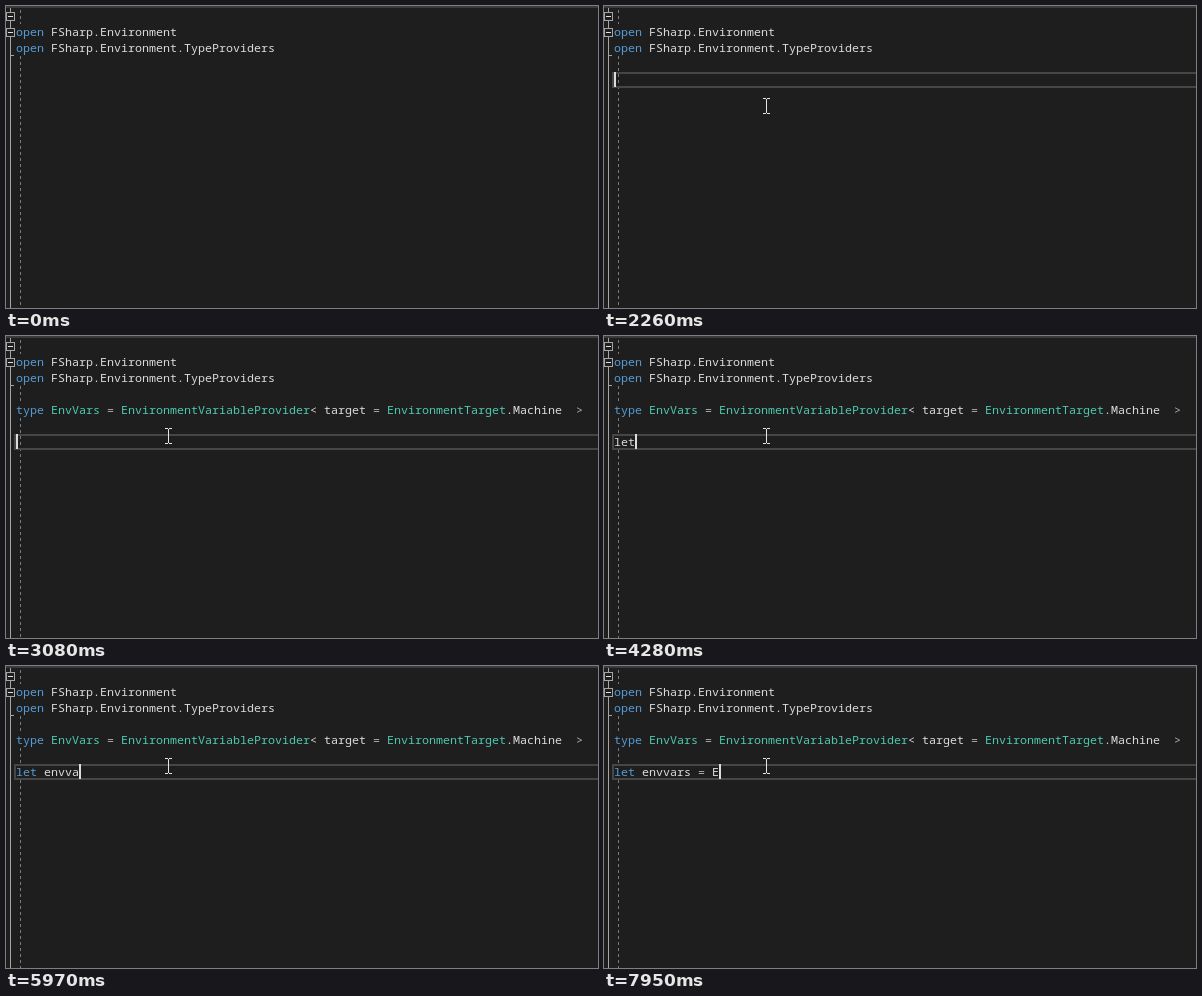
Write an HTML page with a canvas that moves like this. It is 592 px wide and 302 px high and loops after 8 s.

```html
<!DOCTYPE html>
<html lang="en">
<head>
<meta charset="utf-8">
<title>Code editor</title>
<style>
html, body { margin: 0; width: 100%; height: 100%; overflow: hidden; background: #1e1e1e; }
canvas { display: block; }
</style>
</head>
<body>
<canvas id="stage" width="592" height="302"></canvas>
<script>
const ctx = document.getElementById('stage').getContext('2d');
const LOOP = 8000, LEFT = 10, CELL = 7, LINE = 16;
const BLUE = '#569cd6', TEXT = '#dcdcdc', TEAL = '#4ec9b0', OPERATOR = '#b4b4b4';

const CLICK = 2010, PASTE = 2410, DIM = 2670, TYPES = 2720, UNDIM = 2900, ENTER = 3080;
const LET_BLUE = 4990, EQUALS_TINT = 7100;
const typed = 'let envvars = E';
const keyTimes = [4020, 4150, 4280, 4510, 4660, 4890, 5400, 5710, 5970, 6100, 6330, 6700, 6840, 7070, 7950];
const caretOff = [[3310, 3840], [5170, 5400], [6560, 6840], [7380, 7580]];

// time, x, y of the mouse pointer's centre
const path = [
  [1290, 317, 298], [1470, 173, 110], [1650, 173, 110], [1850, 113, 82],
  [1930, 113, 82], [2010, 113, 79], [2090, 116, 80], [2260, 162, 100], [LOOP, 162, 100]
];

function rect(x, y, w, h, color) {
  ctx.fillStyle = color;
  ctx.fillRect(x, y, w, h);
}

// runs: [text, colour] pairs, set on a fixed character grid
function write(top, runs) {
  let x = LEFT;
  for (const [text, color] of runs) {
    ctx.fillStyle = color;
    for (const ch of text) {
      ctx.fillText(ch, x, top + 12);
      x += CELL;
    }
  }
}

function guide(from, to) {
  for (let y = from; y < to; y += 6) rect(14, y, 1, Math.min(3, to - y), '#7a7a7a');
}

function outline() {
  const gray = '#a5a5a5';
  rect(4, 2, 1, 300, gray);
  rect(4, 49, 4, 1, gray);
  for (const y of [6, 22]) {
    rect(0, y, 9, 9, gray);
    rect(1, y + 1, 7, 7, '#1e1e1e');
    rect(2, y + 4, 5, 1, '#e0e0e0');
  }
}

function currentLine(top) {
  ctx.strokeStyle = '#464646';
  ctx.lineWidth = 2;
  ctx.strokeRect(9, top + 1, 600, LINE - 2);
}

function pointer(t) {
  if (t < path[0][0]) return;
  const i = path.findIndex(p => p[0] > t);
  const [t0, x0, y0] = path[i - 1], [t1, x1, y1] = path[i];
  const k = (t - t0) / (t1 - t0);
  const x = Math.round(x0 + (x1 - x0) * k), y = Math.round(y0 + (y1 - y0) * k);
  const color = '#e6e6e6';
  rect(x, y - 7, 1, 14, color);
  for (const edge of [y - 8, y + 7]) {
    rect(x - 3, edge, 3, 1, color);
    rect(x + 1, edge, 3, 1, color);
  }
}

function draw(t) {
  const count = keyTimes.filter(k => k <= t).length;
  const pasted = t >= PASTE;
  const row = t >= ENTER ? 98 : pasted ? 82 : 66;

  rect(0, 0, 592, 302, '#1e1e1e');
  rect(0, 0, 592, 2, '#3a3a3d');
  guide(4, 18);
  guide(50, pasted ? 66 : 302);
  if (pasted) guide(82, count ? 98 : 302);
  if (count) guide(114, 302);
  outline();
  if (t >= CLICK) currentLine(row);

  ctx.font = '11.667px "Noto Sans Mono", "DejaVu Sans Mono", monospace';
  const dim = t >= DIM && t < UNDIM;
  const open = dim ? '#407097' : BLUE, name = dim ? '#999999' : TEXT;
  write(18, [['open ', open], ['FSharp.Environment', name]]);
  write(34, [['open ', open], ['FSharp.Environment.TypeProviders', name]]);

  if (pasted) {
    const type = t >= TYPES ? TEAL : TEXT;
    write(66, [
      ['type ', BLUE], ['EnvVars ', type], ['= ', OPERATOR],
      ['EnvironmentVariableProvider', type], ['< ', TEXT], ['target ', TEXT],
      ['= ', OPERATOR], ['EnvironmentTarget', type], ['.Machine  ', TEXT], ['>', OPERATOR]
    ]);
  }

  const line = typed.slice(0, count);
  write(98, [
    [line.slice(0, 3), t >= LET_BLUE ? BLUE : TEXT], [line.slice(3, 12), TEXT],
    [line.slice(12, 13), t >= EQUALS_TINT ? OPERATOR : TEXT], [line.slice(13), TEXT]
  ]);

  const hidden = caretOff.some(([from, to]) => t >= from && t < to);
  if (t >= CLICK && !hidden) rect(LEFT + count * CELL, row, 2, 15, TEXT);
  pointer(t);
}

const start = performance.now();
function tick() {
  draw((performance.now() - start) % LOOP);
  requestAnimationFrame(tick);
}
tick();
</script>
</body>
</html>
```
